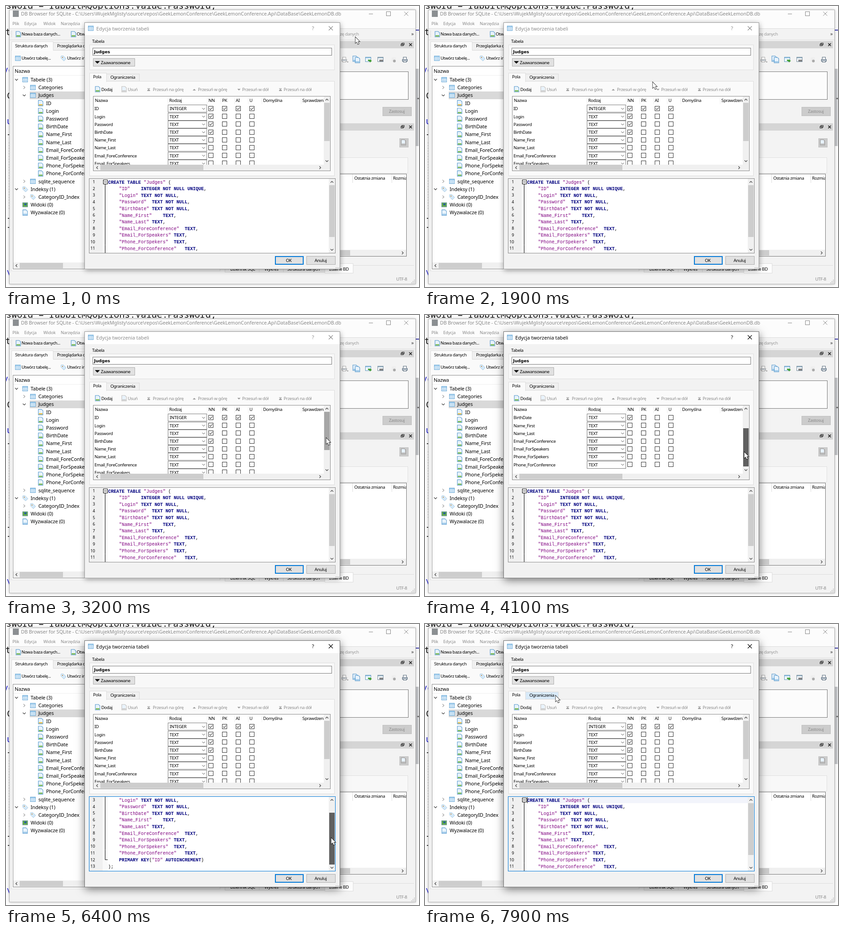
Recreate the animation shown at these times as an HTML page with a canvas. Size 906 px wide and 618 px high, loop 8 s.

```html
<!DOCTYPE html>
<html lang="pl">
<head>
<meta charset="utf-8">
<style>
html, body { margin: 0; width: 100%; height: 100%; overflow: hidden; background: #fff; }
canvas { display: block; }
</style>
</head>
<body>
<canvas id="stage" width="906" height="618"></canvas>
<script>
const c = document.getElementById('stage').getContext('2d');
const UI = '"Noto Sans", sans-serif', MONO = '"Liberation Mono", monospace';
const LOOP = 8000, ROW = 17.2, LINE = 14.6;
const FIELDS = ['ID', 'Login', 'Password', 'BirthDate', 'Name_First', 'Name_Last',
  'Email_ForeConference', 'Email_ForSpeakers', 'Phone_ForSpekers', 'Phone_ForConference'];

const SQL = ['CREATE TABLE "Judges" (', ...FIELDS.map((name, i) => {
  const head = `    "${name}"`;
  const type = i === 0 ? 'INTEGER NOT NULL UNIQUE' : i < 4 ? 'TEXT NOT NULL' : 'TEXT';
  return head.padEnd((Math.floor(head.length / 4) + 1) * 4) + type + ',';
}), '    PRIMARY KEY("ID" AUTOINCREMENT)', ');'];

// Pointer path: time, x, y
const PATH = [[0, 766, 68], [100, 694, 76], [600, 694, 76], [900, 440, 112], [1200, 240, 160],
  [1300, 240, 160], [1700, 440, 104], [2200, 588, 262], [2500, 593, 261], [3100, 702, 270],
  [3300, 702, 270], [4000, 700, 306], [4100, 700, 301], [4500, 700, 301], [5000, 702, 248],
  [5400, 709, 359], [5600, 709, 384], [5800, 715, 449], [6300, 713, 470], [6400, 713, 470],
  [7200, 711, 368], [7900, 286, 157], [8000, 286, 157]];

function pointer(t) {
  const i = Math.max(1, PATH.findIndex(p => p[0] >= t));
  const [t0, x0, y0] = PATH[i - 1], [t1, x1, y1] = PATH[i];
  const k = (t - t0) / (t1 - t0);
  return [Math.round(x0 + (x1 - x0) * k), Math.round(y0 + (y1 - y0) * k)];
}

const clamp = (v, a, b) => Math.min(b, Math.max(a, v));

function fill(x, y, x2, y2, color) {
  c.fillStyle = color;
  c.fillRect(x, y, x2 - x, y2 - y);
}
function box(x, y, x2, y2, bg, edge, w = 1) {
  fill(x, y, x2, y2, bg);
  c.strokeStyle = edge;
  c.lineWidth = w;
  c.strokeRect(x + w / 2, y + w / 2, x2 - x - w, y2 - y - w);
}
function line(pts, color, w = 1, closed) {
  c.beginPath();
  for (let i = 0; i < pts.length; i += 2) c.lineTo(pts[i], pts[i + 1]);
  if (closed) c.closePath();
  c.strokeStyle = color;
  c.lineWidth = w;
  c.stroke();
}
// y is the middle of the capitals
function text(s, x, y, color = '#000', size = 9.6, gap = -.39, font = UI, style = '') {
  c.font = `${style} ${size}px ${font}`;
  c.letterSpacing = gap + 'px';
  c.fillStyle = color;
  c.fillText(s, x, y + size * .36);
}
const tree = (s, x, y) => text(s, x, y, '#000', 10.9, -.12);

function rightText(s, x, y, ...rest) {
  c.textAlign = 'right';
  text(s, x, y, ...rest);
  c.textAlign = 'left';
}
function clipped(x, y, x2, y2, draw) {
  c.save();
  c.beginPath();
  c.rect(x, y, x2 - x, y2 - y);
  c.clip();
  draw();
  c.restore();
}
function chevron(x, y, dx, dy, color = '#444', s = 3, w = 1.2) {
  const a = s / 2;
  line([x - dx * a - dy * s, y - dy * a - dx * s, x + dx * a, y + dy * a,
    x - dx * a + dy * s, y - dy * a + dx * s], color, w);
}
function cross(x, y, r, color, w = 1) {
  line([x - r, y - r, x + r, y + r], color, w);
  line([x - r, y + r, x + r, y - r], color, w);
}
function triangle(x, y, r, dir, color) {
  c.fillStyle = color;
  c.beginPath();
  c.moveTo(x - r, y - dir * r / 2);
  c.lineTo(x + r, y - dir * r / 2);
  c.lineTo(x, y + dir * r / 2);
  c.fill();
}
function tableIcon(x, y) {
  box(x - 6, y - 5.5, x + 6, y + 5.5, '#eaf5ff', '#5b9fd0');
  fill(x - 5, y - 4.5, x + 5, y - 2, '#a5d0ef');
  line([x - 2, y - 5, x - 2, y + 5], '#8cbde0');
  line([x + 2, y - 5, x + 2, y + 5], '#8cbde0');
  line([x - 6, y + 1.5, x + 6, y + 1.5], '#a9cfe9');
}
function pageIcon(x, y, edge = '#4d94cc', mark = '#72b644') {
  line([x - 5, y - 6, x + 2, y - 6, x + 5, y - 3, x + 5, y + 6, x - 5, y + 6], edge, 1.1, true);
  fill(x - 4, y - 5, x + 3, y + 5, '#e8f3fc');
  fill(x - 4, y + 2.5, x + 4, y + 5, mark);
}
function tagIcon(x, y) {
  const shape = [x - 5, y - 5, x, y - 5, x + 6, y + 1, x + 1, y + 6, x - 5, y];
  line(shape, '#74aad2', 1, true);
  c.fillStyle = '#d5e9f8';
  c.fill();
  fill(x - 3, y - 3, x - 1, y - 1, '#c58b45');
}
function printerIcon(x, y, color) {
  box(x - 4, y - 6, x + 4, y, '#fff', color);
  box(x - 6, y - 1, x + 6, y + 4, '#ccd5de', color);
  box(x - 4, y + 2, x + 4, y + 6, '#fff', color);
}

function backdrop() {
  fill(0, 0, 906, 618, '#fff');
  const code = (s, x, y, color = '#111') => text(s, x, y, color, 19.7, 0, '"Noto Sans Mono", monospace');
  c.textAlign = 'right';
  code('Password = rabbitMQOptions.Value.Password;', 461, -1);
  c.textAlign = 'left';
  code('at', -13, 57);
  code('yc', -7, 140, '#2323d0');
  code('C', 2, 197);
  code('u', 2, 253, '#2323d0');
  code('\\', 0, 588, '#2323d0');
  [282, 466, 486].forEach(y => fill(4, y, 7, y + 2, '#444'));
  for (let y = 300; y < 450; y += 6) fill(6, y, 7, y + 2, '#ccc');
  fill(898, 52, 906, 54, '#3939aa');
  fill(898, 138, 905, 308, '#c4c5c9');
  fill(902, 202, 906, 205, '#777');
}

function mainLeft() {
  c.save();
  c.shadowColor = '#0004';
  c.shadowBlur = 6;
  fill(7, 8, 899, 612, '#f5f5f5');
  c.restore();
  box(7, 8, 899, 612, '#f3f3f3', '#b3b3b3');
  fill(8, 9, 898, 49, '#fcfcfc');
  fill(15, 10, 28, 24, '#8b8f92');
  text('DB Browser for SQLite - C:\\Users\\WujekMglisty\\source\\repos\\GeekLemonConference\\GeekLemonConference.Api\\DataBase\\GeekLemonDB.db',
    33, 17, '#888', 10.54, 0);
  line([796, 17.5, 805, 17.5], '#888');
  c.strokeRect(834.5, 12.5, 9, 9);
  cross(878, 17, 4.5, '#888');
  [['Plik', 14], ['Edycja', 40], ['Widok', 82], ['Narzędzia', 120]]
    .forEach(([s, x]) => text(s, x, 39, '#888', 9.4, -.15));

  line([8, 49.5, 898, 49.5], '#ddd');
  line([8, 74.5, 898, 74.5], '#ddd');
  for (let y = 55; y < 70; y += 3) fill(12, y, 13, y + 1, '#aaa');
  pageIcon(27, 62);
  text('Nowa baza danych...', 34, 62);
  pageIcon(148, 62);
  text('Otwórz', 155, 62);
  rightText('Zamknij bazę danych', 774, 62, '#999');
  text('»', 889, 61, '#333', 11);

  box(11, 97, 470, 583, '#fafafa', '#ddd');
  box(103, 80, 200, 98, '#f0f0f0', '#d9d9d9');
  box(12, 78, 104, 98, '#fcfcfc', '#ddd');
  fill(13, 96, 103, 99, '#fcfcfc');
  text('Struktura danych', 20, 88);
  text('Przeglądarka danych', 112, 88);
  tableIcon(26, 115);
  text('Utwórz tabelę...', 34, 115);
  tagIcon(126, 115);
  text('Utwórz indeks', 134, 115);

  box(15, 132, 470, 579, '#fff', '#8a8a8a');
  tree('Nazwa', 19, 143);
  line([16, 152.5, 172, 152.5], '#eee');
  fill(52, 188, 173, 205, '#d9d9d9');
  const at = n => 162 + n * ROW;
  const branch = (s, n, depth, icon, open) => {
    const x = 23 + depth * 17;
    if (open === true) chevron(x, at(n), 0, 1, '#333', 3.2);
    if (open === false) chevron(x, at(n), 1, 0, '#999', 3.2);
    icon(x + 19, at(n));
    tree(s, x + 31, at(n));
  };
  branch('Tabele (3)', 0, 0, tableIcon, true);
  branch('Categories', 1, 1, tableIcon, false);
  branch('Judges', 2, 1, tableIcon, true);
  FIELDS.forEach((s, i) => {
    pageIcon(76, at(i + 3), '#4d94cc', i ? '#72b644' : '#e6b93d');
    tree(s, 88, at(i + 3));
  });
  branch('sqlite_sequence', 13, 1, tableIcon, false);
  branch('Indeksy (1)', 14, 0, tagIcon, true);
  branch('CategoryID_Index', 15, 1, tagIcon, false);
  branch('Widoki (0)', 16, 0, (x, y) => {
    box(x - 6, y - 5, x + 6, y + 5, '#65ad47', '#6d91ad');
    fill(x - 2, y - 3, x + 3, y + 1, '#26619b');
  });
  branch('Wyzwalacze (0)', 17, 0, (x, y) => pageIcon(x, y, '#4d94cc', '#9dc9ea'));
  fill(16, 564, 469, 578, '#f0f0f0');
  fill(30, 565, 125, 577, '#cdcdcd');
  chevron(23, 571, -1, 0);
}

function dockBar(y) {
  fill(700, y, 895, y + 16, '#d5d5d5');
  c.strokeStyle = '#222';
  c.lineWidth = 1;
  c.strokeRect(866.5, y + 6.5, 5, 4);
  c.strokeRect(868.5, y + 4.5, 5, 4);
  cross(887.5, y + 8, 3, '#222', 1.6);
}

function mainRight() {
  dockBar(77);
  printerIcon(742, 118, '#aaa');
  line([748, 123, 751, 123], '#555');
  pageIcon(766, 116, '#4d94cc', '#9dc9ea');
  pageIcon(771, 119, '#4d94cc', '#9dc9ea');
  box(788, 112, 801, 123, '#eef7ff', '#6b9dbf');
  fill(789, 113, 800, 115, '#9bc6e6');
  fill(794, 118, 801, 121, '#47a03a');
  triangle(799, 122, 4, 1, '#47a03a');
  box(815, 112, 828, 123, '#f5f8fb', '#7a8f9f');
  fill(816, 113, 827, 115, '#9bb6c6');
  fill(819, 118, 827, 122, '#858585');
  fill(846, 113, 855, 122, '#eee');
  c.fillStyle = '#aaa';
  c.beginPath(); c.arc(852, 121, 3, 0, 7); c.fill();
  printerIcon(875, 118, '#57697a');

  box(700, 144, 883, 206, '#fcfcfc', '#777');
  box(826, 222, 890, 242, '#ccc', '#bfbfbf');
  text('Zastosuj', 840, 232, '#888');
  dockBar(258);
  box(863, 291, 883, 311, '#ccc', '#bfbfbf');
  pageIcon(872, 300, '#999', '#bbb');
  box(700, 333, 882, 368, '#f8f8f8', '#e0e0e0');
  box(700, 369, 879, 551, '#fff', '#777');
  clipped(700, 370, 878, 550, () => {
    line([760.5, 370, 760.5, 389], '#ddd');
    line([846.5, 370, 846.5, 389], '#ddd');
    text('Ostatnia zmiana', 764, 379);
    text('Rozmiar', 849, 379);
  });
  fill(700, 536, 878, 550, '#f0f0f0');
  fill(700, 537, 755, 549, '#cdcdcd');
  chevron(870, 543, 1, 0);

  line([474, 570.5, 895, 570.5], '#ddd');
  [480, 555, 608].forEach((x, i) => box(x, 568, [556, 609, 700][i], 586, '#f0f0f0', '#d9d9d9'));
  box(699, 566, 762, 588, '#fdfdfd', '#ddd');
  text('Dziennik SQL', 492, 579);
  text('Wykres', 567, 579);
  text('Struktura danych', 617, 579);
  text('Zdalne BD', 709, 579);
  text('UTF-8', 856, 601, '#888');
  for (let i = 0; i < 3; i++)
    for (let j = 0; j <= i; j++) fill(895 - j * 3, 602 + i * 3, 896.5 - j * 3, 603.5 + i * 3, '#aaa');
}

function dialogFrame(s) {
  const ink = s.active ? '#000' : '#8b8b8b';
  c.save();
  c.shadowColor = s.active ? '#0008' : '#0006';
  c.shadowBlur = s.active ? 18 : 11;
  c.shadowOffsetY = s.active ? 4 : 2;
  fill(173, 37, 733, 579, '#f0f0f0');
  c.restore();
  box(172, 36, 733, 579, '#f2f2f2', s.active ? '#6e6e6e' : '#999');
  fill(173, 37, 732, 64, '#fff');
  tableIcon(186, 49);
  text('Edycja tworzenia tabeli', 198, 50, ink, 10.8, 0);
  text('?', 671, 49, ink, 11, 0);
  cross(712.5, 49, 4.5, ink, 1.1);

  text('Tabela', 189, 78);
  box(183, 85, 721, 141, '#f8f8f8', '#dfdfdf');
  box(190, 92, 715, 109, '#fff', s.over(190, 92, 715, 109) ? '#171717' : '#7a7a7a');
  text('Judges', 193, 101, '#000', 9.3, 0, '"DejaVu Sans", sans-serif', 'bold');
  const hot = s.over(191, 115, 283, 132);
  box(191, 115, 283, 133, hot ? '#e5f1fb' : '#e1e1e1', hot ? '#0078d7' : '#adadad');
  triangle(200.5, 124, 5.5, 1, '#000');
  text('Zaawansowane', 208, 125);

  box(183, 165, 721, 374, '#fafafa', '#dcdcdc');
  box(220, 149, 293, 166, s.over(221, 149, 292, 165) ? '#d8eaf9' : '#f0f0f0', '#d9d9d9');
  box(183, 147, 221, 167, '#fafafa', '#dcdcdc');
  fill(184, 164, 220, 168, '#fafafa');
  text('Pola', 191, 156);
  text('Ograniczenia', 229, 157);

  pageIcon(201, 183);
  text('Dodaj', 209, 184);
  pageIcon(259, 183, '#bbb', '#ccc');
  [['Usuń', 267], ['Przesuń na górę', 322], ['Przesuń w górę', 421], ['Przesuń w dół', 518],
    ['Przesuń na dół', 609]].forEach(([w, x]) => text(w, x, 184, '#8a8a8a'));
  [[313, -1], [413, -1], [511, 1], [602, -1]].forEach(([x, d], i) => {
    triangle(x, 184, 3.5, d, '#999');
    if (i % 3 === 0) { fill(x - 3, 181, x + 3, 182, '#999'); fill(x - 3, 186, x + 3, 187, '#999'); }
  });

  box(590, 550, 653, 569, '#e1e1e1', '#0078d7', 2);
  text('OK', 614, 560);
  box(659, 550, 723, 569, '#e1e1e1', '#adadad');
  text('Anuluj', 677, 560);
  for (let i = 0; i < 3; i++) fill(729 - i * 3, 575, 730.5 - i * 3, 576.5, '#aaa');
}

function fieldTable(s) {
  box(191, 198, 712, 363, '#fff', '#8a8a8a');
  clipped(192, 199, 697, 349, () => {
    [['Nazwa', 195], ['Rodzaj', 358], ['NN', 444], ['PK', 474], ['AI', 504], ['U', 534],
      ['Domyślna', 564], ['Sprawdzenie', 650]].forEach(([w, x]) => text(w, x, 208));
    [355, 441, 471, 501, 531, 561, 647].forEach(x => line([x + .5, 200, x + .5, 216], '#eee'));
  });
  clipped(192, 217, 697, 349, () => {
    for (let i = s.row; i < FIELDS.length; i++) {
      const y = 226 + (i - s.row) * ROW, top = Math.round(y - 8.6);
      if (y < 348 && s.over(192, top, 697, top + 17)) fill(192, top, 697, top + 17, '#e5f3ff');
      text(FIELDS[i], 194, y);
      box(355, top, 441, top + 17, '#fff', '#7a7a7a');
      text(i ? 'TEXT' : 'INTEGER', 359, y);
      chevron(433.5, y, 0, 1, '#444', 3, 1);
      for (let k = 0; k < 4; k++) {
        const x = 444 + k * 30, b = Math.round(y - 6);
        box(x, b, x + 11, b + 11, '#fff', '#333');
        if (i === 0 || (k === 0 && i < 4))
          line([x + 2.5, b + 5.5, x + 4.5, b + 8, x + 9, b + 3], '#222', 1.1);
      }
    }
  });
  fill(697, 199, 711, 362, '#f0f0f0');
  fill(192, 349, 711, 362, '#f0f0f0');
  chevron(704, 206, 0, -1);
  chevron(704, 341, 0, 1);
  fill(698, 213 + s.tableTop, 710, 297 + s.tableTop, s.tableThumb);
  chevron(200, 355.5, -1, 0);
  chevron(689, 355.5, 1, 0);
  fill(207, 349, 433, 361, '#cdcdcd');
}

function codeLine(src, x, y) {
  let col = 0;
  for (const [part] of src.matchAll(/"[^"]*"|\w+|\s+|[^\w\s"]+/g)) {
    const word = /^\w/.test(part);
    const color = part[0] === '"' ? '#7f007f' : word ? '#00007f' : '#000';
    text(part, x + col * 6, y, color, 10, 0, MONO, word ? 'bold' : '');
    col += part.length;
  }
}

function codeView(s) {
  box(182, 379, 723, 544, '#fff', s.focus ? '#0078d7' : '#8a8a8a');
  clipped(183, 380, 708, 543, () => {
    fill(183, 380, 212, 543, '#f0f0f0');
    fill(212, 380, 223, 543, '#f9f9f9');
    const at = i => 387 + (i - s.line) * LINE;
    if (s.focus) fill(224, at(0) - 7, 708, at(0) + 7, '#f2f4fb');
    line([217.5, at(0), 217.5, at(9) + LINE / 2, 217.5, at(11), 223, at(11)], '#000');
    box(213, 382 - s.line * LINE, 223, 392 - s.line * LINE, '#fff', '#000');
    line([215, at(0), 221, at(0)], '#000');
    SQL.forEach((src, i) => {
      rightText(String(i + 1), 195, at(i), '#000', 8.8, -.2);
      codeLine(src, 224, at(i));
    });
    if (s.focus) fill(224, at(0) - 6, 225, at(0) + 7, '#000');
  });
  fill(708, 380, 722, 543, '#f0f0f0');
  chevron(715, 387, 0, -1);
  chevron(715, 536, 0, 1);
  fill(709, 394 + s.codeTop, 721, 508 + s.codeTop, s.codeThumb);
}

function arrow(x, y) {
  const shape = [0, 0, 0, 13, 3, 10.3, 5.4, 15.6, 7.6, 14.6, 5.3, 9.5, 9.3, 9.5];
  c.save();
  c.translate(x + .5, y + .5);
  line(shape, '#000', 1.4, true);
  c.fillStyle = '#fff';
  c.fill();
  c.restore();
}

function stateAt(t) {
  const [x, y] = pointer(t);
  const over = (x1, y1, x2, y2) => x >= x1 && x < x2 && y >= y1 && y < y2;
  const thumb = (pressed, hot) => pressed ? '#606060' : hot ? '#a6a6a6' : '#cdcdcd';
  const tableDrag = t >= 3300 && t <= 5000, codeDrag = t >= 5800 && t <= 7200;
  const tableTop = !tableDrag ? 0 : t < 4100 ? clamp(y - 270, 0, 36)
    : t <= 4500 ? 36 : clamp(y - 265, 0, 36);
  const codeTop = codeDrag ? clamp(y - 449, 0, 21) : 0;
  return {
    x, y, over, tableTop, codeTop,
    active: t >= 3300,
    focus: t >= 5800,
    row: Math.round(tableTop / 12),
    line: Math.round(codeTop / 10.5),
    tableThumb: thumb(tableDrag, over(697, 213, 711, 297) || (t > 5000 && t < 5700)),
    codeThumb: thumb(codeDrag, over(708, 394, 722, 508))
  };
}

function draw(now) {
  const s = stateAt(Math.floor((now % LOOP) / 100) * 100);
  backdrop();
  mainLeft();
  mainRight();
  dialogFrame(s);
  fieldTable(s);
  codeView(s);
  arrow(s.x, s.y);
  requestAnimationFrame(draw);
}
requestAnimationFrame(draw);
</script>
</body>
</html>
```
